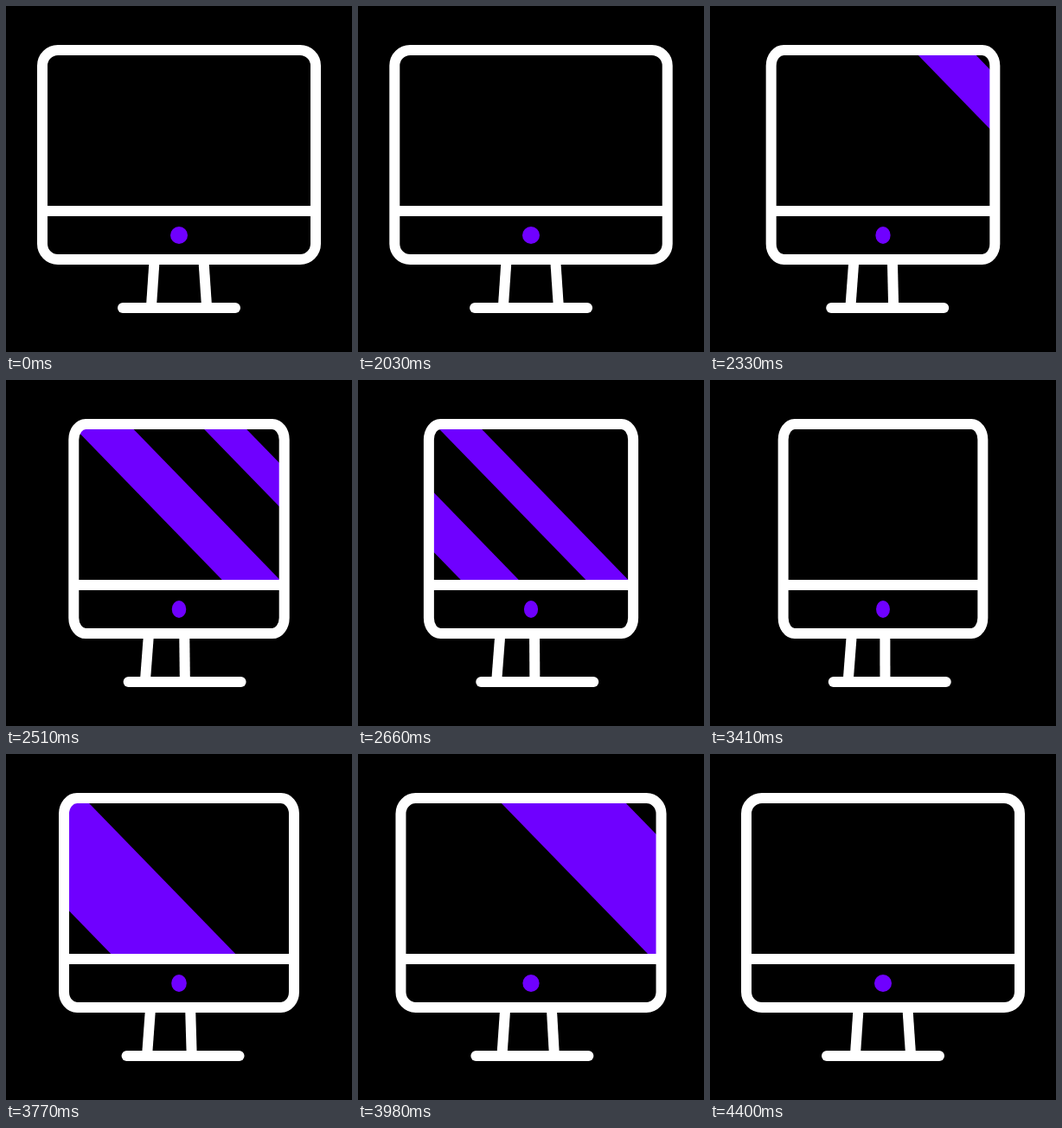
An HTML page with a canvas for the animation above (4.43 s loop, 400x400 px).

```html
<!DOCTYPE html>
<html lang="en">
<head>
<meta charset="utf-8">
<title>Turning monitor</title>
<style>
  html, body { margin: 0; width: 100%; height: 100%; overflow: hidden; background: #000; }
  canvas { display: block; width: 400px; height: 400px; }
</style>
</head>
<body>
<canvas id="stage" width="400" height="400"></canvas>
<script>
const ctx = document.getElementById('stage').getContext('2d');
const LOOP = 4430, TURN = 2000, BACK = 3200, END = 4400;
const WHITE = '#fff', PURPLE = '#6f00ff';
const SLOPE = 0.972;

const clamp01 = v => Math.min(1, Math.max(0, v));
const phase = (t, start, length) => clamp01((t - start) / length);
const mix = (a, b, p) => a + (b - a) * p;
const sine = u => (1 - Math.cos(Math.PI * u)) / 2;

// cubic-bezier(x1, 0, x2, 1)
function ease(u, x1, x2) {
  let low = 0, high = 1, s = 0.5;
  for (let i = 0; i < 24; i++) {
    s = (low + high) / 2;
    const r = 1 - s;
    const x = 3 * s * r * r * x1 + 3 * s * s * r * x2 + s * s * s;
    if (x < u) low = s; else high = s;
  }
  return s * s * (3 - 2 * s);
}

function turnAmount(t) {
  return t < BACK
    ? ease(phase(t, TURN, BACK - TURN), 0.2, 0)
    : 1 - ease(phase(t, BACK, END - BACK), 0.65, 0.35);
}

function line(x1, y1, x2, y2) {
  ctx.beginPath();
  ctx.moveTo(x1, y1);
  ctx.lineTo(x2, y2);
  ctx.stroke();
}

// Diagonal band; center is measured along the top edge of the screen
function stripe(center, width) {
  const top = 45, bottom = 237;
  const left = center - width / 2, right = center + width / 2;
  const shear = y => (y - 57) * SLOPE;
  ctx.beginPath();
  ctx.moveTo(left + shear(top), top);
  ctx.lineTo(right + shear(top), top);
  ctx.lineTo(right + shear(bottom), bottom);
  ctx.lineTo(left + shear(bottom), bottom);
  ctx.fill();
}

function sheen(t) {
  const sweep = (start, from, to, length, width) =>
    stripe(mix(from, to, sine(phase(t, start, length))), width);
  if (t < BACK) {
    sweep(TURN, 422, -155, 980, 67);
    sweep(TURN + 155, 422, -155, 980, 49);
  } else {
    sweep(3375, -200, 460, 1000, 144);
  }
}

function draw(t) {
  const p = turnAmount(t);
  const x = mix(42, 80 + 6, p), w = 400 - 2 * x;

  ctx.fillStyle = '#000';
  ctx.fillRect(0, 0, 400, 400);
  ctx.fillStyle = PURPLE;
  ctx.strokeStyle = WHITE;
  ctx.lineWidth = 12;

  const frame = new Path2D();
  frame.roundRect(x, 51, w, 242, { x: 18 * w / 316, y: 18 });
  ctx.save();
  ctx.clip(frame);
  sheen(t);
  ctx.restore();

  ctx.beginPath();
  ctx.ellipse(200, 265, 10 - 2.1 * p, 10, 0, 0, 2 * Math.PI);
  ctx.fill();

  ctx.stroke(frame);
  ctx.lineCap = 'butt';
  line(x, 237, x + w, 237);
  line(171.5 - 8 * p, 295, 168 - 8.5 * p, 347);
  line(228.5 - 27 * p, 295, 232 - 30.5 * p, 347);
  ctx.lineCap = 'round';
  line(135 + 8 * p, 349, 265 + 8 * p, 349);
}

const began = performance.now();
function tick() {
  draw((performance.now() - began) % LOOP);
  requestAnimationFrame(tick);
}
tick();
</script>
</body>
</html>
```
